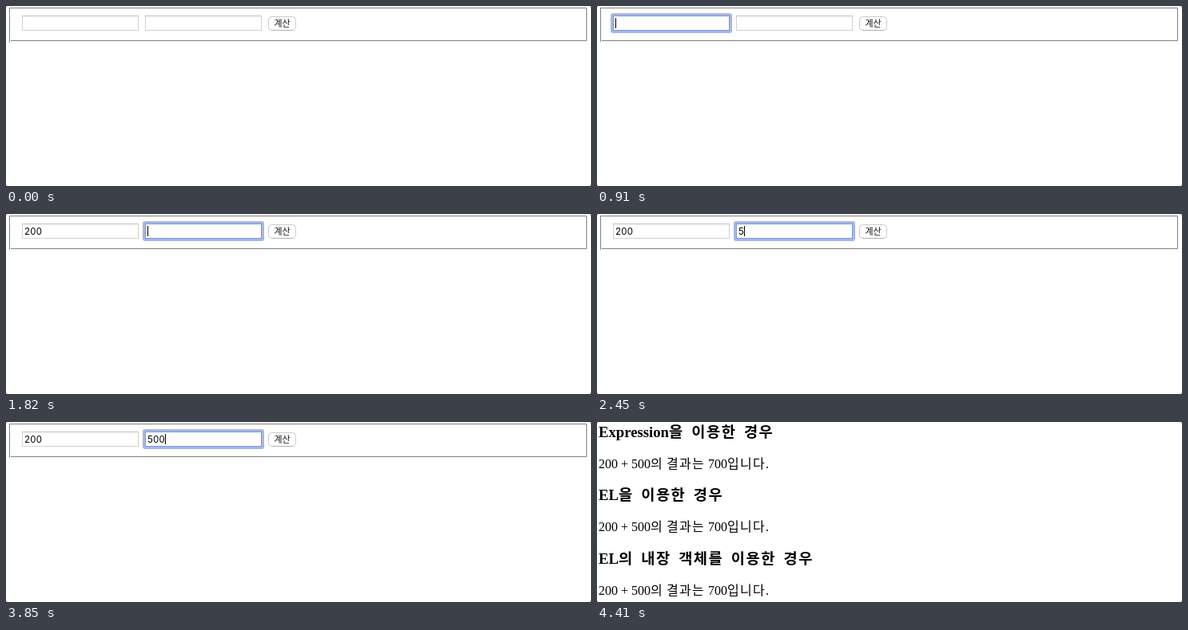
An HTML page that plays this animation: 732x226 px, repeating every 6510 ms.

```html
<!DOCTYPE html>
<html lang="ko">
<head>
<meta charset="utf-8">
<style>
html, body { margin: 0; width: 100%; height: 100%; overflow: hidden; background: #fff; }
svg { display: block; }
.value { font: 11.5px Inter, sans-serif; letter-spacing: .2px; }
.label { font: 11px "Noto Sans CJK KR", "Noto Sans CJK", sans-serif; }
.head, .line { font: 16px "Liberation Serif", "Noto Sans CJK KR", "Noto Sans CJK", serif; }
.head { font-size: 18.72px; font-weight: 700; }
.ko { font-family: "Noto Sans CJK KR", "Noto Sans CJK", sans-serif; letter-spacing: .08em; }
.head .ko { word-spacing: .15em; }
</style>
</head>
<body>
<svg width="732" height="226" viewBox="0 0 732 226">
  <defs>
    <linearGradient id="blue" x2="0" y2="1">
      <stop stop-color="#64adfa"/><stop offset="1" stop-color="#0f6ff0"/>
    </linearGradient>
  </defs>
  <path fill="#777" d="M0 0h1v1h-1zM731 0h1v1h-1zM0 225h1v1h-1zM731 225h1v1h-1z"/>
  <g id="form">
    <path fill="none" stroke="#808080" d="M4 2.5H726.5V43.5H6"/>
    <rect id="side" x="4" y="2" width="1" fill="#808080"/>
    <g id="fields"></g>
    <rect id="button" x="328.5" y="13.5" width="34" height="17" rx="4"/>
    <path id="edge" d="M332 30.5H359" stroke="#b0b0b0"/>
    <text id="label" class="label" x="335.5" y="25.5">계산</text>
  </g>
  <g id="result"></g>
</svg>
<script>
const LOOP = 6510;
const $ = id => document.getElementById(id);
const show = (el, on) => el.setAttribute('visibility', on ? 'inherit' : 'hidden');

// Each field has a focus interval and the times at which its digits are typed.
const fields = [
  { x: 20, text: '200', keys: [1260, 1540, 1680], focus: [910, 1820] },
  { x: 174, text: '500', keys: [2450, 2590, 2730], focus: [1820, 4060] }
];

$('fields').innerHTML = fields.map(({ x }) => `<g>
  <rect x="${x - 3}" y="9" width="152" height="25" rx="3" fill="#a5b7e8"/>
  <rect x="${x + .5}" y="12.5" width="145" height="18" fill="#fff"/>
  <path d="M${x} 12.5h146" stroke="#bdbdbd"/>
  <text class="value" x="${x + 3}" y="26"/>
  <rect y="15" width="1" height="13"/></g>`).join('');
fields.forEach((f, i) => {
  [f.ring, f.box, f.top, f.value, f.caret] = $('fields').children[i].children;
});

const ko = s => `<tspan class="ko">${s}</tspan>`;
const titles = [['Expression', '을 이용한 경우'], ['EL', '을 이용한 경우'], ['EL', '의 내장 객체를 이용한 경우']];
$('result').innerHTML = titles.map(([latin, rest], i) => {
  const y = Math.round(19 + i * 79.4);
  return `<text class="head" x="2" y="${y}">${latin}${ko(rest)}</text>
    <text class="line" x="2" y="${y + 39}">200 + 500${ko('의')} ${ko('결과는')} 700${ko('입니다')}.</text>`;
}).join('');

function caretAlpha(t) {
  if (t >= 3220 && t < 3290) return .5;
  return t >= 3290 && t < 3850 ? 0 : 1;
}

function drawField(f, t) {
  const focused = t >= f.focus[0] && t < f.focus[1];
  const count = f.keys.filter(k => t >= k).length;
  f.value.textContent = f.text.slice(0, count);
  f.box.setAttribute('stroke', focused ? '#8399d0' : '#d0d0d0');
  show(f.ring, focused);
  show(f.top, !focused);
  show(f.caret, focused);
  f.caret.setAttribute('x', f.x + 3 + Math.floor(count * 22 / 3));
  f.caret.setAttribute('opacity', caretAlpha(t));
}

function draw(t) {
  const done = t >= 4410, pressed = t >= 4060 && t < 4270;
  show($('form'), !done);
  show($('result'), done);
  $('side').setAttribute('height', t < 70 ? 44 : 43);
  fields.forEach(f => drawField(f, t));
  $('button').setAttribute('fill', pressed ? 'url(#blue)' : '#fff');
  $('button').setAttribute('stroke', pressed ? '#2f7de0' : '#cacaca');
  $('label').setAttribute('fill', pressed ? '#fff' : '#111');
  show($('edge'), !pressed && !done);
}

const start = performance.now();
function tick() {
  draw((performance.now() - start) % LOOP);
  requestAnimationFrame(tick);
}
tick();
</script>
</body>
</html>
```
